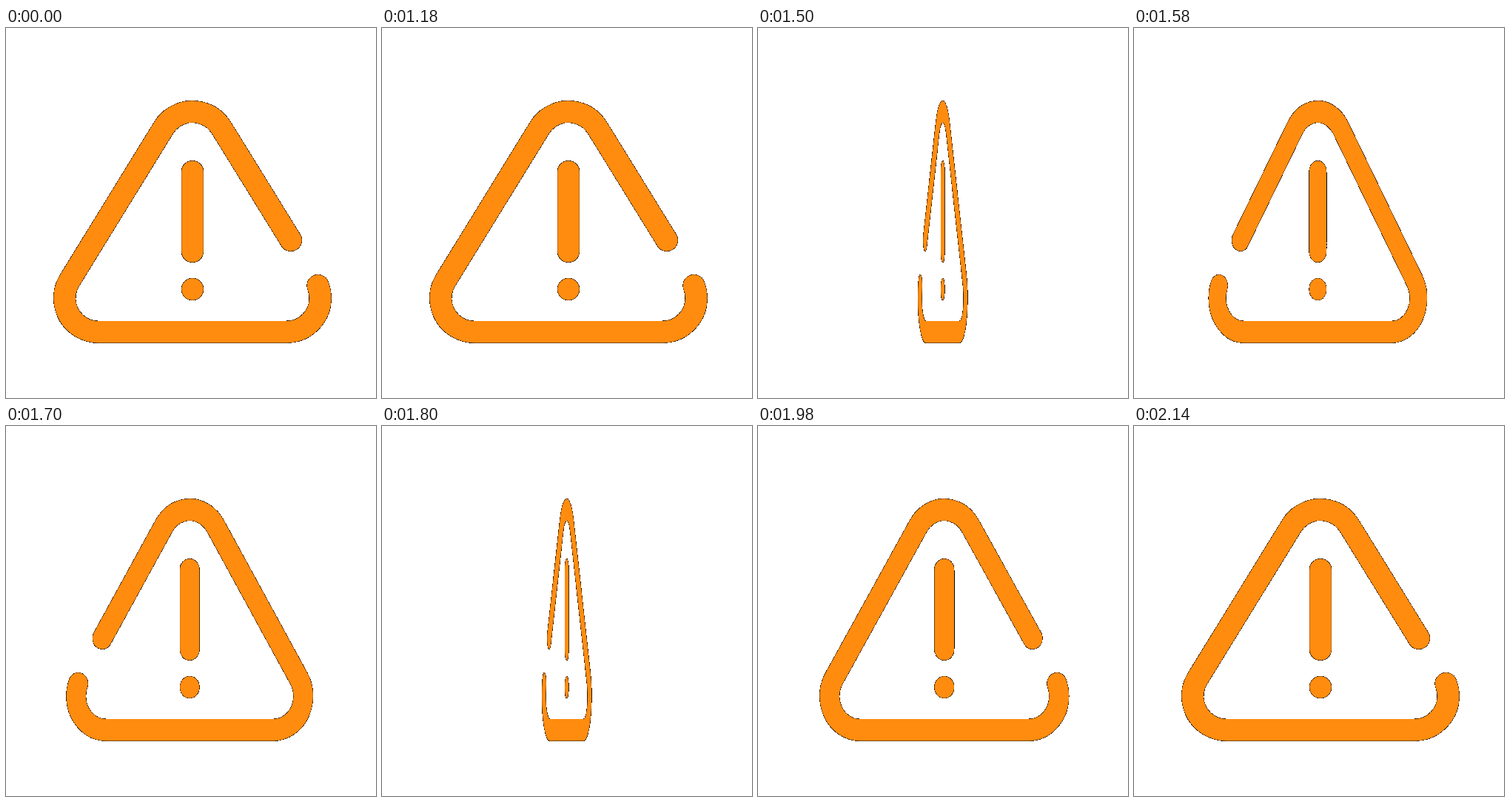
An HTML page with a canvas for the animation above (3000 ms loop, 500 px wide and 500 px high).

```html
<!DOCTYPE html>
<html lang="en">
<head>
<meta charset="utf-8">
<title>Turning warning sign</title>
<style>
  html, body { margin: 0; width: 100%; height: 100%; overflow: hidden; background: #fff; }
  canvas { display: block; width: 500px; height: 500px; }
</style>
</head>
<body>
<canvas id="stage" width="500" height="500"></canvas>
<script>
const SIZE = 500, LOOP = 3000, STEP = 20;
const TURN_START = 1157.5, TURN_LENGTH = 985;
const ORANGE = [255, 140, 14];

const ctx = document.getElementById('stage').getContext('2d', { willReadFrequently: true });

function buildSign() {
  const middle = 252, radius = 45.75;
  const apex = { x: middle, y: 158.8 };
  const left = { x: 125, y: 365 };
  const right = { x: 2 * middle - left.x, y: left.y };
  const slope = Math.atan2(left.y - apex.y, apex.x - left.x);
  const tilt = Math.PI / 2 - slope;
  const hookEnd = -0.377;

  const sign = new Path2D();
  sign.moveTo(384.9, 286.8);
  sign.arc(apex.x, apex.y, radius, -tilt, Math.PI + tilt, true);
  sign.arc(left.x, left.y, radius, Math.PI + tilt, Math.PI / 2, true);
  sign.arc(right.x, right.y, radius, Math.PI / 2, hookEnd, true);

  sign.moveTo(middle, 194.2);
  sign.lineTo(middle, 301.8);
  sign.moveTo(middle, 353);
  sign.lineTo(middle, 353.01);
  return sign;
}

const sign = buildSign();

// Every partly covered pixel turns opaque, darkened by what it lacks.
function hardenEdges() {
  const image = ctx.getImageData(0, 0, SIZE, SIZE);
  const px = image.data;
  for (let i = 0; i < px.length; i += 4) {
    const cover = px[i + 3];
    if (cover === 0 || cover === 255) continue;
    for (let c = 0; c < 3; c++) px[i + c] = ORANGE[c] * cover / 255;
    px[i + 3] = cover > 4 ? 255 : 0;
  }
  ctx.putImageData(image, 0, 0);
}

function turnAt(time) {
  const u = Math.min(1, Math.max(0, (time - TURN_START) / TURN_LENGTH));
  return u * u * (3 - 2 * u) * 2 * Math.PI;
}

function draw(time) {
  const scale = Math.cos(turnAt(time));
  ctx.setTransform(1, 0, 0, 1, 0, 0);
  ctx.clearRect(0, 0, SIZE, SIZE);
  ctx.setTransform(scale, 0, 0, 1, SIZE / 2 * (1 - scale), 0);
  ctx.lineWidth = 29.5;
  ctx.lineCap = 'round';
  ctx.strokeStyle = `rgb(${ORANGE})`;
  ctx.stroke(sign);
  hardenEdges();
}

const start = performance.now();
let shown = -1;

function tick() {
  const elapsed = (performance.now() - start) % LOOP;
  const time = Math.floor(elapsed / STEP) * STEP;
  if (time !== shown) draw(shown = time);
  requestAnimationFrame(tick);
}
tick();
</script>
</body>
</html>
```
